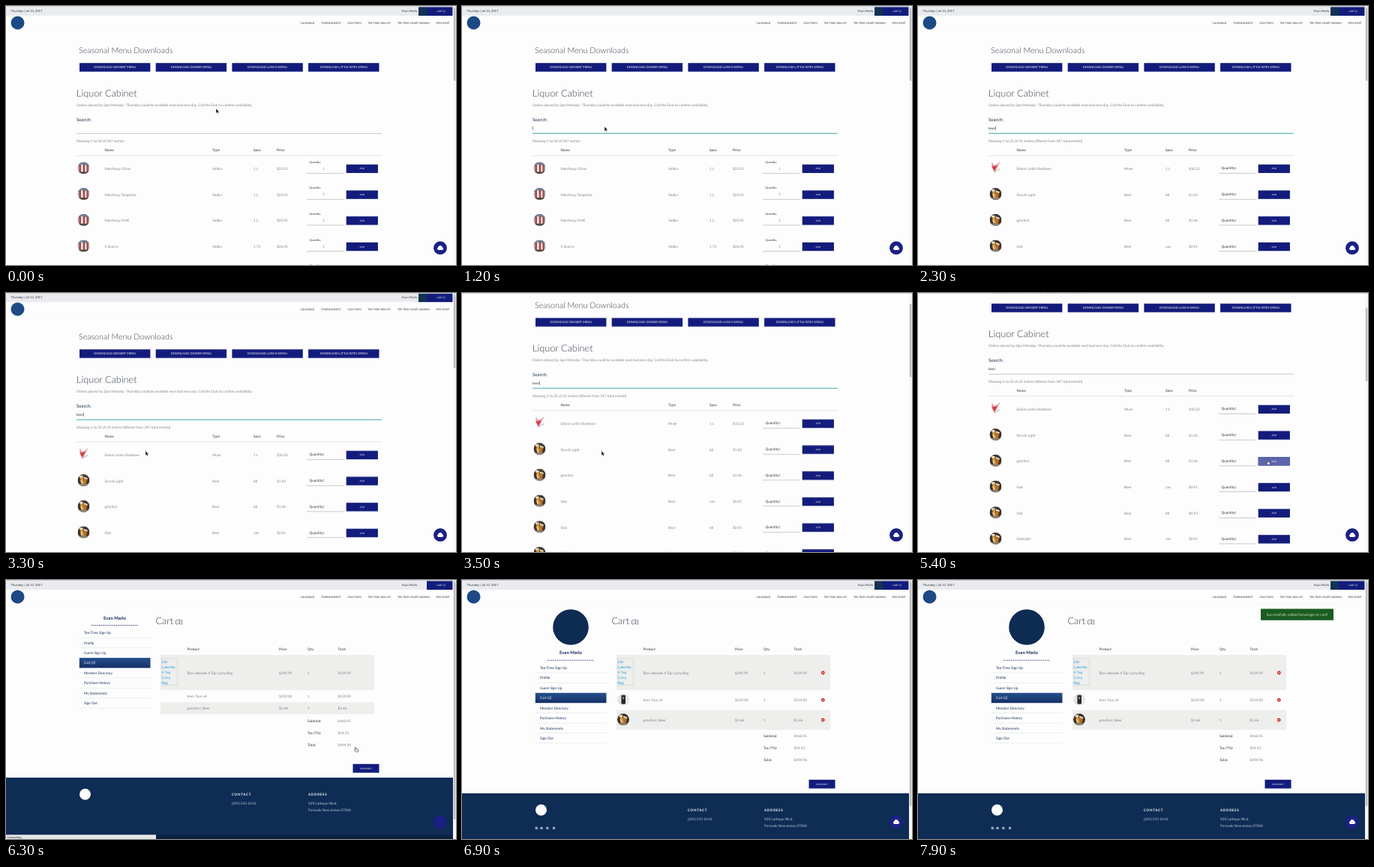
An HTML page that plays this animation: 600 by 346 pixels, repeating every 8 s.

```html
<!DOCTYPE html>
<html lang="en">
<head>
<meta charset="utf-8">
<title>Club shop</title>
<style>
html, body { margin: 0; height: 100%; overflow: hidden; background: #fdfdfd; }
svg { display: block; width: 100vw; height: 100vh; }
text { font: 400 4.69px Lato, "Open Sans", sans-serif; fill: #7d7f82; text-rendering: geometricPrecision; white-space: pre; }
.title { font-weight: 300; font-size: 12.72px; fill: #333d49; }
.sub { font-weight: 300; font-size: 10.74px; fill: #333d49; }
.count { font-size: 8.7px; fill: #4a535f; }
.label { font-size: 6.2px; fill: #1b2f4e; }
.head { font-weight: 700; fill: #5d6066; }
.dark { fill: #2b2f3a; }
.float { font-size: 3.85px; fill: #2b2f3a; }
.nav { font-size: 3.5px; fill: #2a2e36; }
.top { font-size: 4.12px; fill: #33373e; }
.btn { font-size: 4.08px; fill: #fff; text-anchor: middle; }
.tiny { font-size: 3px; fill: #fff; text-anchor: middle; }
.user { font-weight: 700; font-size: 6px; fill: #14295c; text-anchor: middle; }
.menu { fill: #14295c; }
.menu.on { fill: #fff; }
.alt { fill: #1d9fdc; }
.foot { fill: #c3cbd8; }
.foothead { font-weight: 700; font-size: 4.6px; letter-spacing: .65px; fill: #fff; }
.status { font-weight: 700; font-size: 3.6px; fill: #444; }
.toast { font-size: 5.17px; fill: #b9dcae; text-anchor: middle; }

#scroll { animation: scroll 8s infinite; }
#thumb { animation: thumb 8s infinite; }
#pointer { animation: pointer 8s infinite ease-in-out; }
#toast { animation: toast 8s infinite; }
#caret { animation: blink 1s infinite step-end; }

@keyframes scroll {
  0%, 40.6% { transform: translateY(0); animation-timing-function: cubic-bezier(.6, 0, .35, 1); }
  46.25%, 100% { transform: translateY(-62px); }
}
@keyframes thumb {
  0%, 40.6% { transform: translateY(0); animation-timing-function: cubic-bezier(.6, 0, .35, 1); }
  46.25%, 100% { transform: translateY(18px); }
}
@keyframes pointer {
  0%, 2% { transform: translate(280px, 137px); }
  11.25%, 35% { transform: translate(190px, 161px); }
  40.5%, 46.5% { transform: translate(186px, 211px); }
  53%, 57% { transform: translate(419.5px, 240px); }
  63%, 100% { transform: translate(465px, 223.5px); }
}
@keyframes toast {
  0%, 89% { opacity: 0; }
  94%, 100% { opacity: 1; }
}
@keyframes blink {
  0% { opacity: 1; }
  55%, 100% { opacity: 0; }
}
</style>
</head>
<body>
<svg id="stage" viewBox="0 0 600 346" preserveAspectRatio="none">
  <defs>
    <clipPath id="disc"><circle r="8"/></clipPath>
    <linearGradient id="active" x2="0" y2="1">
      <stop stop-color="#24508c"/><stop offset="1" stop-color="#142f66"/>
    </linearGradient>
    <g id="vodka" clip-path="url(#disc)">
      <rect x="-8" y="-8" width="16" height="16" fill="#aab0ba"/>
      <path d="M-8-8h16v5h-16z" fill="#6f7d90"/>
      <path d="M-6-4h2.4v11h-2.4zM-.6-5h2.2v11h-2.2zM4-4h2.2v11h-2.2z" fill="#b2433f"/>
      <path d="M-3.2-5h2v12h-2zM2-4h1.6v11h-1.6z" fill="#eceef1"/>
      <path d="M-8 5h16v3h-16z" fill="#55493f"/>
    </g>
    <g id="beer" clip-path="url(#disc)">
      <rect x="-8" y="-8" width="16" height="16" fill="#40352c"/>
      <path d="M-5-4h3.6l3 9h-4z" fill="#dc9a38"/>
      <path d="M0-3l4.6 1.6-1.4 6.6-3-.4z" fill="#b8702a"/>
      <path d="M-5.6-6h4.4l.6 2.4h-4.6zM.4-4.6l5 1.8-.6 1.8-5-1.8zM-4.4 0l1.4-.4 1.4 4.4-1.4.4z" fill="#eee3cc"/>
      <path d="M-8 5h16v3h-16z" fill="#8d8273"/>
    </g>
    <g id="soda">
      <path d="M-6-3.5l10-1.5-5 12z" fill="#e0a3a8"/>
      <path d="M-5-2l7-1-4 7z" fill="#d33a48"/>
      <path d="M0-2L5.5-7.5M-3-3l-2-4" stroke="#c43a48" stroke-width=".8"/>
      <path d="M1 4l5-3" stroke="#8a9bb5" stroke-width=".8"/>
    </g>
    <g id="gadget" clip-path="url(#disc)">
      <rect x="-8" y="-8" width="16" height="16" fill="#e6e6e5"/>
      <rect x="-2.6" y="-6" width="5.6" height="12" rx="1.4" fill="#26282b"/>
      <rect x="-1.2" y="-3.5" width="2.4" height="3" fill="#7d8288"/>
    </g>
  </defs>
</svg>
<script>
const LOOP = 8000, NAVY = '#131c7c', DEEP = '#0e2c54', TEAL = '#4dbdb9';
const USER = 'Evan Marlo';
const rules = [];

const text = (x, y, str, cls = '') => `<text x="${x}" y="${y}" class="${cls}">${str}</text>`;
const rect = (x, y, w, h, fill, more = '') =>
  `<rect x="${x}" y="${y}" width="${w}" height="${h}" fill="${fill}" ${more}/>`;
const disc = (x, y, r, fill) => `<circle cx="${x}" cy="${y}" r="${r}" fill="${fill}"/>`;
const use = (id, x, y) => `<use href="#${id}" x="${x}" y="${y}"/>`;

// Shows its content only between two times of the loop.
function during(from, to, content) {
  const name = `on${from}to${to}`, at = ms => ms / LOOP * 100 + '%';
  rules.push(`@keyframes ${name}{0%{opacity:0}${at(from)}{opacity:1}${at(to)}{opacity:0}}`);
  return `<g style="animation:${name} 8s step-end infinite">${content}</g>`;
}

function header(cart, ready = true) {
  const nav = [[392.5, 'CALENDAR'], [420, 'TOURNAMENTS'], [455.5, 'GOLF INFO'], [482.5, 'TEE-TIME SIGN UP'],
    [522, 'TEE-TIME CHART (ADMIN)'], [573.5, 'PRO SHOP']];
  return rect(0, 0, 596, 13, '#e9ebee') + text(6.5, 8.3, 'Thursday | Jul 13, 2017', 'top') +
    text(528, 8.3, USER, 'top') + (ready ? rect(550, 1.4, 11.5, 11.6, '#113253') : '') +
    rect(561, 1.4, 34.4, 11.6, NAVY) + text(580, 8.4, `CART (${cart})`, 'tiny') +
    disc(15.5, 22.5, 9, '#1c4a85') + rect(0, 32, 596, .5, '#f3f4f5') +
    nav.map(([x, s]) => text(x, 24.4, s, 'nav')).join('');
}

const addButton = (y, fill) => rect(453.7, y - 5.5, 42.2, 11.4, fill) + text(474.8, y + 1.2, 'ADD', 'tiny');

function tableRow([pic, name, type, spec, price], i, floated) {
  const y = 217.2 + i * 34.7;
  const qty = floated
    ? text(404.5, y - 7.7, 'Quantity', 'float') + text(422.3, y + 1.5, '1')
    : text(404.5, y + 1.2, 'Quantity', 'dark') + text(422.3, y + 1.2, '1');
  return use(pic, 103.5, y - .8) + text(131.5, y + 1.7, name) + text(275, y + 1.7, type) +
    text(330, y + 1.7, spec) + text(361, y + 1.7, price) + qty + rect(401, y + 6, 49, .6, '#a5a7ab') +
    addButton(y, NAVY);
}

const spirits = [
  ['vodka', 'Marchway Citrus', 'Vodka', '1 L', '$25.95'],
  ['vodka', 'Marchway Tangerine', 'Vodka', '1 L', '$25.95'],
  ['vodka', 'Marchway Chilli', 'Vodka', '1 L', '$25.95'],
  ['vodka', '5 Acorns', 'Vodka', '1.75', '$26.41'],
  ['vodka', '5 Acorns', 'Vodka', '1 L', '$26.41']];
const beers = [
  ['soda', 'Edwin Larkin Rootbeer', 'Mixer', '1 L', '$10.22'],
  ['beer', 'Dorvik Light', 'Beer', 'btl', '$1.42'],
  ['beer', 'greyfern', 'Beer', 'btl', '$1.46'],
  ['beer', 'Oak', 'Beer', 'can', '$0.91'],
  ['beer', 'Oak', 'Beer', 'btl', '$0.93'],
  ['beer', 'OakLight', 'Beer', 'can', '$0.91'],
  ['beer', 'OakLight', 'Beer', 'btl', '$1.42']];

function shop() {
  const downloads = ['DESSERT', 'DINNER', 'LUNCH', 'LITTLE BITES'].map((s, i) =>
    rect(98 + i * 101.7, 76.2, 94.4, 11.5, NAVY) +
    text(145.2 + i * 101.7, 83.4, `DOWNLOAD ${s} MENU`, 'btn')).join('');
  const heads = [[131.5, 'Name'], [275, 'Type'], [330, 'Spec'], [361, 'Price']]
    .map(([x, s]) => text(x, 193.5, s, 'head')).join('');
  const keys = [1300, 1450, 1600, 1750, 5900];
  const typed = ['b', 'be', 'bee', 'beer'].map((s, i) =>
    during(keys[i], keys[i + 1], text(94, 164.9, s, 'dark'))).join('');
  const stops = [1000, ...keys.slice(0, 4), 5200];
  const caret = [94.2, 96.8, 99.2, 101.6, 103.4].map((x, i) =>
    during(stops[i], stops[i + 1], rect(x, 160.7, .5, 5.2, '#222'))).join('');
  return header(2) + text(97, 63.4, 'Seasonal Menu Downloads', 'sub') + downloads +
    text(94, 121, 'Liquor Cabinet', 'title') +
    text(94, 133.6, 'Orders placed by 3pm Monday- Thursday could be available next business day. ' +
      'Call the Club to confirm availability.') +
    text(94, 153.7, 'Search:', 'label') + typed + `<g id="caret">${caret}</g>` +
    rect(94, 169.9, 407, .6, '#a0a3a8') + during(1000, 5200, rect(94, 169.7, 407, 1, TEAL)) +
    heads + rect(94, 199.6, 407, .6, '#cfd0d2') +
    during(0, 1700, text(94, 182, 'Showing 1 to 50 of 347 entries') +
      spirits.map((r, i) => tableRow(r, i, true)).join('')) +
    during(1700, 5900, text(94, 182, 'Showing 1 to 25 of 25 entries (filtered from 347 total entries)') +
      beers.map((r, i) => tableRow(r, i, false)).join('')) +
    during(4950, 5900, addButton(286.6, '#5d66ac'));
}

function sidebar(shift) {
  const items = ['Tee-Time Sign Up', 'Profile', 'Guest Sign Up', 'Cart (3)', 'Member Directory',
    'Purchase History', 'My Statements', 'Sign Out'];
  return `<g transform="translate(0 ${shift})">` + text(145, 52.5, USER, 'user') +
    `<path d="M114 60.5H176.5" stroke="#14295c" stroke-width="1.1" stroke-dasharray="1.2 1.3"/>` +
    items.map((s, i) => {
      const y = 63.8 + i * 13.42, on = i === 3;
      return (on ? rect(97.8, y, 94.7, 13.4, 'url(#active)') : rect(97.8, y + 13.1, 94.7, .5, '#dcdee1')) +
        text(104, y + 8.4, s, on ? 'menu on' : 'menu');
    }).join('') + '</g>';
}

function cartPage(loaded) {
  const rowY = loaded ? [124, 160.2, 187] : [124, 155.4, 171.3];
  const totalY = loaded ? 208.5 : 188, footY = loaded ? 285 : 264;
  const goods = [['Elm Lakeside 4 Top Carry Bag', '$199.99'], ['Kern Tour v4', '$259.00'], ['greyfern | Beer', '$1.46']];
  const sums = [['Subtotal:', '$460.45'], ['Tax (7%):', '$34.53'], ['Total:', '$494.98']];
  const heads = [[241.5, 'Product'], [364, 'Price'], [402, 'Qty.'], [442.5, 'Total']]
    .map(([x, s]) => text(x, 94, s, 'head')).join('');
  const stripes = rect(206, 100, 285, 47, '#eeeeec') +
    (loaded ? rect(206, 173.6, 285, 26.6, '#eeeeec') : rect(206, 163.3, 285, 16, '#eeeeec'));
  const rows = goods.map(([name, price], i) => {
    const y = rowY[i] + 1.7;
    const remove = disc(481.3, rowY[i], 2.4, '#cf2a27') +
      `<path d="M480.3 ${rowY[i] - 1}l2 2m0-2l-2 2" stroke="#fff" stroke-width=".6"/>`;
    return text(241.5, y, name) + text(364, y, price) + text(402, y, '1') + text(442.5, y, price) +
      (loaded ? remove : '');
  }).join('');
  const alt = ['Elm', 'Lakeside', '4 Top', 'Carry', 'Bag'].map((s, i) =>
    text(208, 111.3 + i * 6.8, s, 'alt')).join('');
  const totals = sums.map(([k, v], i) => {
    const y = totalY + 1.7 + i * 16.1;
    return text(402, y, k, 'dark') + text(442.5, y, v);
  }).join('');
  const social = [99.3, 106, 113.8, 122.5].map(x => disc(x, 331.4, 1.9, '#8fa0b8')).join('');
  const footer = rect(0, footY, 596, 90, DEEP) + rect(0, footY + 76.5, 596, 20, '#0a2140') +
    disc(105.5, footY + 22.3, 7.5, '#fff') +
    text(301, footY + 23.7, 'CONTACT', 'foothead') + text(403, footY + 23.7, 'ADDRESS', 'foothead') +
    text(301, footY + 35.5, '(201) 555-0142', 'foot') + text(403, footY + 35.5, '420 Larkspur Blvd.', 'foot') +
    text(403, footY + 45.3, 'Fernvale New Jersey 07000', 'foot') + (loaded ? social : '');
  const checkY = footY - 18.2;
  return rect(0, 0, 600, 346, '#fdfdfd') + header(3, loaded) + (loaded ? disc(145, 63, 23.8, '#0e2c52') : '') +
    sidebar(loaded ? 46.8 : 0) + text(199.5, 59.4, 'Cart', 'title') + text(225.8, 59.2, '(3)', 'count') +
    heads + stripes + rect(207.4, 105, 21, 35.6, 'none', 'stroke="#b5b7ba" stroke-width=".5" stroke-dasharray="1 .5"') +
    alt + rows + (loaded ? use('gadget', 215, 159.7) + use('beer', 215, 186.3) : '') + totals +
    rect(462.5, checkY, 35, 11.7, NAVY) + text(480, checkY + 6.9, 'CHECKOUT', 'tiny') + footer;
}

const scrollbar = (id, h) => rect(596, 0, 4, 346, '#f6f6f6') +
  rect(596.8, 2, 2.5, h, '#bcbcbc', `rx="1.2" ${id}`);
const cloud = disc(576.9, 324.1, 1.9, '#fff') + disc(579, 322.6, 2.6, '#fff') + disc(581.3, 324.1, 1.9, '#fff') +
  rect(576.9, 323.5, 4.4, 2.5, '#fff');
const arrow = '<path d="M0 0V6.2L1.5 4.9 2.5 7.1 3.5 6.7 2.5 4.5H4.4Z" fill="#111" stroke="#fff" stroke-width=".4"/>';
const hand = '<path d="M.5.3Q1.3-.3 1.6.6L2 2.2 4 2.7Q4.9 3 4.7 4L4.2 6H1.3L-.6 3.6Q-.4 2.8.8 3.3Z" ' +
  'fill="#fff" stroke="#111" stroke-width=".6"/>';

const page =
  during(0, 5900, `<g id="scroll">${shop()}</g>` + scrollbar('id="thumb"', 98)) +
  during(5900, 6700, cartPage(false) + scrollbar('', 318)) +
  during(6700, LOOP, cartPage(true) + scrollbar('', 300)) +
  rect(0, 0, 600, .8, '#c9cbce') +
  disc(579, 323.2, 8.9, '#1a2183') + during(0, 5900, cloud) + during(6700, LOOP, cloud) +
  during(5600, 6700, rect(0, 340.3, 200, 6, '#e6e7e8') + text(1.5, 344.6, 'Connecting...', 'status')) +
  `<g id="toast">${rect(457, 38.6, 97, 15.2, '#1c5c20', 'rx=".6"')}${text(505.5, 48, 'Successfully added beverage to cart!', 'toast')}</g>` +
  `<g id="pointer">${during(0, 1350, arrow)}${during(2850, 4950, arrow)}${during(4950, 6650, hand)}</g>`;

document.getElementById('stage').insertAdjacentHTML('beforeend', page);
const sheet = document.createElement('style');
sheet.textContent = rules.join('\n');
document.head.append(sheet);
</script>
</body>
</html>
```
